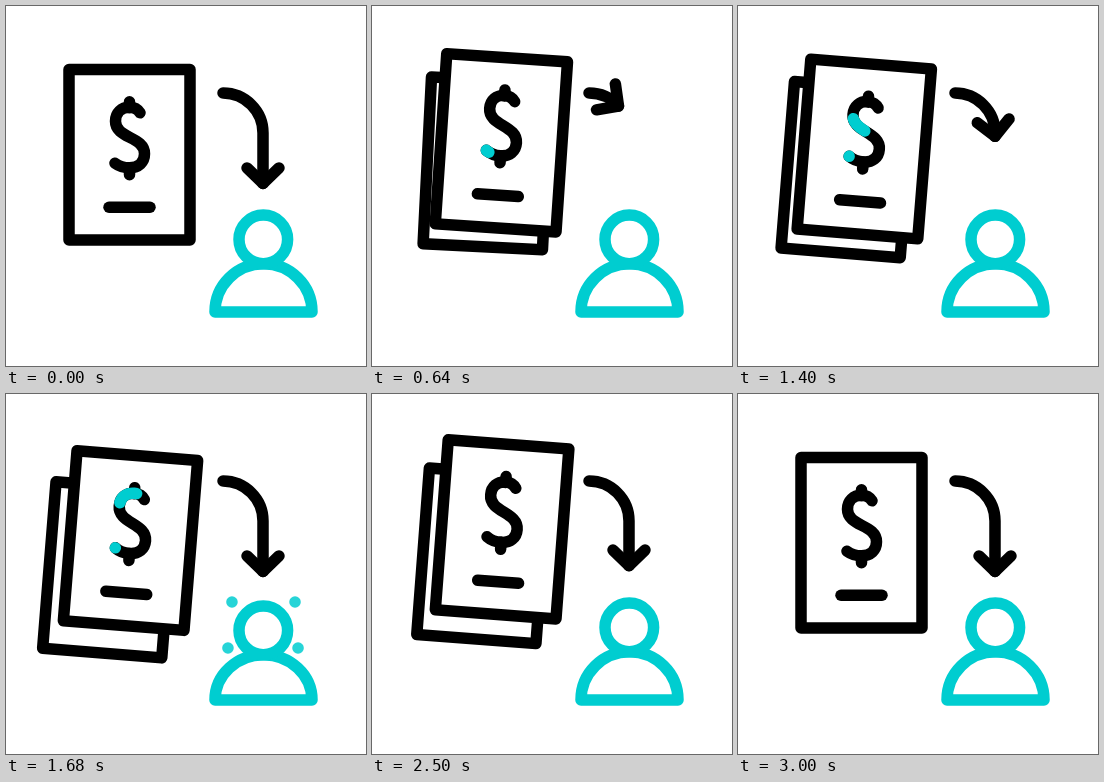
Animation of 360 by 360 pixels, one loop 3.32 s. Source, as an HTML page:

```html
<!DOCTYPE html>
<html lang="en">
<head>
<meta charset="utf-8">
<title>Payment to a person</title>
<style>
  html, body { margin: 0; width: 100%; height: 100%; overflow: hidden; background: #fff; }
  svg { display: block; width: 100%; height: 100%; fill: none; stroke: #000; stroke-width: 11.5; stroke-linecap: round; stroke-linejoin: round; }
  .cyan { stroke: #00cdd0; }
</style>
</head>
<body>
<svg viewBox="0 0 360 360">
  <rect id="back" x="-59.75" y="-83.5" width="119.5" height="167" fill="#fff"/>
  <g id="front">
    <rect x="-60.5" y="-85.25" width="121" height="170.5" fill="#fff"/>
    <path d="M-20.5 52.5H20.5"/>
    <path d="M0-53V-47M0 13V20"/>
    <path id="s" d="M-14.5 8.5C-10.5 11.5-5.5 13 0 13C9 13 15 7.5 15-1C15-18.5-14-16-14-33.5C-14-42-8-47.5 0-47.5C4-47.5 8-46 10.5-42"/>
    <path id="glow" class="cyan"/>
    <path id="stub" class="cyan" d="M0-53V-47"/>
  </g>
  <path id="shaft" d="M217 87A40 40 0 0 1 257 127V177.5"/>
  <path id="tip" d="M-15.5-16L0 0L-15.5 16"/>
  <g class="cyan">
    <path id="body"/>
    <circle id="head" cx="257.3" r="24.3"/>
    <path id="rays" opacity=".85"/>
  </g>
</svg>
<script>
const LOOP = 3320, SHAFT = 113.3, BEND = 20 * Math.PI, S_LENGTH = 117;
const el = id => document.getElementById(id);
const set = (id, name, value) => el(id).setAttribute(name, value);
const show = (id, on) => set(id, 'visibility', on ? 'visible' : 'hidden');
const clamp = x => Math.min(1, Math.max(0, x));
const ramp = (t, from, to) => clamp((t - from) / (to - from));
const ease = p => (1 - Math.cos(Math.PI * p)) / 2;

// Eased value through time/value pairs.
function track(t, ...keys) {
  let value = keys[1];
  for (let i = 2; i < keys.length; i += 2) {
    value += (keys[i + 1] - keys[i - 1]) * ease(ramp(t, keys[i - 2], keys[i]));
  }
  return value;
}

function placeCard(id, out, drop, [ox, oy], [dx, dy]) {
  const x = 123.5 + ox * out + dx * drop;
  const y = 148.75 + oy * out + dy * drop;
  set(id, 'transform', `translate(${x} ${y}) rotate(${4.6 * out})`);
}

function drawCards(t) {
  placeCard('back',
    track(t, 295, 0, 890, 1, 2420, 1, 2950, 0),
    track(t, 1345, 0, 1650, 1, 1700, 1, 2050, 0), [-13.6, 13.8], [-7, 13.3]);
  placeCard('front',
    track(t, 220, 0, 790, 1, 2420, 1, 2950, 0),
    track(t, 1230, 0, 1500, 1, 1680, 1, 1990, 0), [7, -14.2], [-6, 12]);

  const start = S_LENGTH * ramp(t, 685, 2036);
  const end = S_LENGTH * ramp(t, 610, 1780);
  set('glow', 'stroke-dasharray', `0 ${start} ${end - start} 999`);
  show('glow', end > start);
  show('stub', t > 1800 && t < 2036);
}

function drawArrow(t) {
  const s = track(t, 220, SHAFT, 790, 18, 1230, 18, 1570, SHAFT,
    1700, SHAFT, 1980, 107, 2420, 107, 2950, SHAFT);
  const turn = Math.min(s, BEND) / 40;
  const x = 217 + 40 * Math.sin(turn);
  const y = 127 - 40 * Math.cos(turn) + Math.max(0, s - BEND);
  const angle = 90 * clamp((s - 8) / BEND);
  set('shaft', 'stroke-dasharray', `${s} 999`);
  set('tip', 'transform', `translate(${x} ${y}) rotate(${angle})`);
}

function drawPerson(t) {
  const dip = track(t, 1560, 0, 1680, 3, 2020, 3, 2240, 0);
  set('head', 'cy', 233.4 + dip);
  set('body', 'd', `M209 306A48.5 ${48.2 - dip} 0 0 1 306 306Z`);

  const start = ease(ramp(t, 1720, 2220)), end = ease(ramp(t, 1660, 2160));
  const ray = (x, y, dx, dy) =>
    `M${x + dx * start} ${y + dy * start}L${x + dx * end} ${y + dy * end}`;
  set('rays', 'd', ray(226, 208, -13, -13) + ray(289, 208, 13, -13)
    + ray(222, 254, -20, 0) + ray(292, 254, 20, 0));
  show('rays', end > start);
}

function frame() {
  const t = performance.now() % LOOP;
  drawCards(t);
  drawArrow(t);
  drawPerson(t);
  requestAnimationFrame(frame);
}

set('glow', 'd', el('s').getAttribute('d'));
set('glow', 'pathLength', S_LENGTH);
frame();
</script>
</body>
</html>
```
